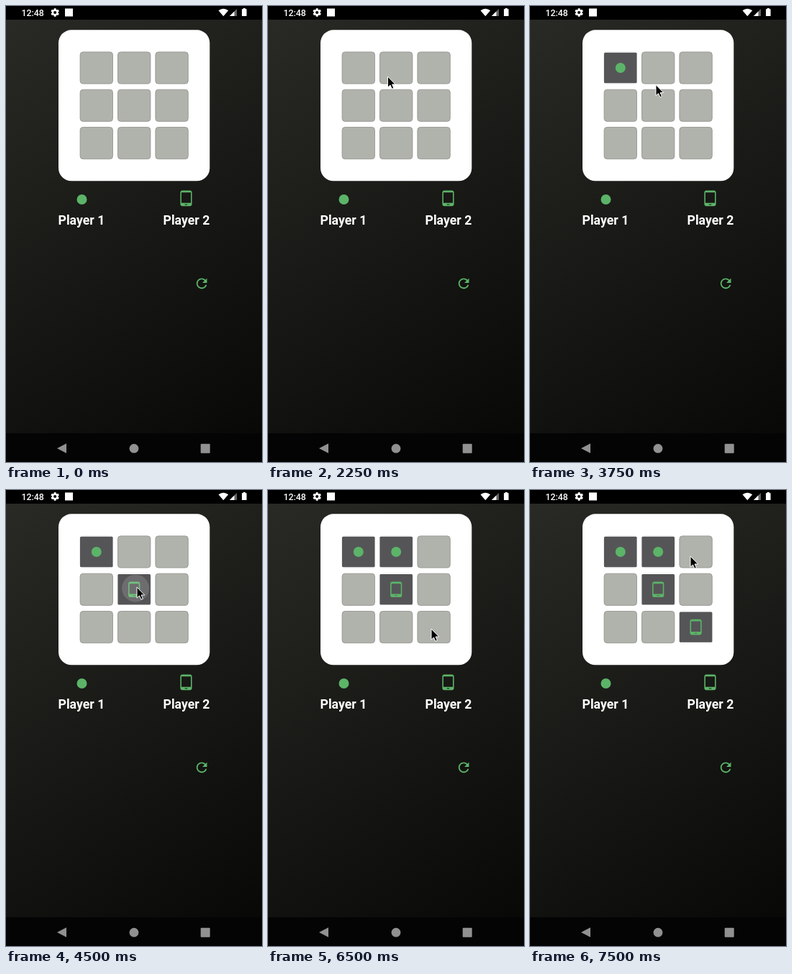
Recreate the animation shown at these times as an HTML page. Size 356x634 px, loop 8000 ms.

```html
<!DOCTYPE html>
<html lang="en">
<head>
<meta charset="utf-8">
<title>Tic-tac-toe</title>
<style>
html, body { margin: 0; width: 100%; height: 100%; overflow: hidden; background: #000; }
svg { display: block; }
text { font-family: Roboto, sans-serif; fill: #fff; }
.name { font-size: 17.7px; font-weight: 700; }
.mark { fill: #5cb468; }
.nav { fill: #919191; }
</style>
</head>
<body>
<svg id="stage" width="356" height="634" viewBox="0 0 356 634">
  <defs>
    <linearGradient id="bg" gradientUnits="userSpaceOnUse" x1="0" y1="19" x2="356" y2="594">
      <stop stop-color="#292925"/><stop offset="1" stop-color="#080807"/>
    </linearGradient>
    <circle id="disc" r="7"/>
    <path id="tablet" transform="scale(.9) translate(-12 -12)" d="M18 0H6C4.34 0 3 1.34 3 3v18c0 1.66 1.34 3 3 3h12c1.66 0 3-1.34 3-3V3c0-1.66-1.34-3-3-3zm-4 22h-4v-1h4v1zm5.25-3H4.75V3h14.5v16z"/>
  </defs>
  <rect y="19" width="356" height="575" fill="url(#bg)"/>
  <rect y="594" width="356" height="40" fill="#040404"/>

  <!-- status bar -->
  <text x="21.4" y="13.5" font-size="12.4" font-weight="500">12:48</text>
  <g fill="#fff">
    <path transform="translate(61.2 2) scale(.58)" d="M19.43 12.98c.04-.32.07-.64.07-.98s-.03-.66-.07-.98l2.11-1.65c.19-.15.24-.42.12-.64l-2-3.46c-.12-.22-.39-.3-.61-.22l-2.49 1c-.52-.4-1.08-.73-1.69-.98l-.38-2.65C14.46 2.18 14.25 2 14 2h-4c-.25 0-.46.18-.49.42l-.38 2.65c-.61.25-1.17.59-1.69.98l-2.49-1c-.23-.09-.49 0-.61.22l-2 3.46c-.13.22-.07.49.12.64l2.11 1.65c-.04.32-.07.65-.07.98s.03.66.07.98l-2.11 1.65c-.19.15-.24.42-.12.64l2 3.46c.12.22.39.3.61.22l2.49-1c.52.4 1.08.73 1.69.98l.38 2.65c.03.24.24.42.49.42h4c.25 0 .46-.18.49-.42l.38-2.65c.61-.25 1.17-.59 1.69-.98l2.49 1c.23.09.49 0 .61-.22l2-3.46c.12-.22.07-.49-.12-.64l-2.11-1.65zM12 15.5c-1.93 0-3.5-1.57-3.5-3.5s1.57-3.5 3.5-3.5 3.5 1.57 3.5 3.5-1.57 3.5-3.5 3.5z"/>
    <rect x="82" y="3.5" width="11" height="11"/>
    <path d="M295.5 6.3Q302.3 1 309.2 6.3L302.3 14.3z"/>
    <path fill="#666" d="M311 14L321 4V14z"/>
    <path d="M311 14L317.5 7.5V14z"/>
    <path d="M328 4.2h1.8V3h3v1.2h1.8V14H328z"/>
  </g>

  <rect x="73" y="33.3" width="210.3" height="210" rx="18" fill="#fff"/>
  <g id="board"></g>

  <g class="mark">
    <use href="#disc" x="105.5" y="269"/>
    <use href="#tablet" x="250.5" y="267.4"/>
    <path transform="translate(261.1 374.8) scale(.92)" d="M17.65 6.35C16.2 4.9 14.21 4 12 4c-4.42 0-7.99 3.58-7.99 8s3.57 8 7.99 8c3.73 0 6.84-2.55 7.73-6h-2.08c-.82 2.33-3.04 4-5.65 4-3.31 0-6-2.69-6-6s2.69-6 6-6c1.66 0 3.14.69 4.22 1.78L13 11h7V4l-2.35 2.35z"/>
  </g>
  <text class="name" x="72.5" y="303.8">Player 1</text>
  <text class="name" x="218.5" y="303.8">Player 2</text>

  <g class="nav">
    <path d="M71 615L84 608.2V621.8z"/>
    <circle cx="178" cy="615.2" r="6.4"/>
    <rect x="270.7" y="608.7" width="13" height="13" rx="1"/>
  </g>

  <path id="cursor" fill="#000" stroke="#fff" stroke-width="1" d="M0 0V15.2L3.5 12 5.9 17.3 8.4 16.2 6.1 11H10.7z"/>
</svg>
<script>
const LOOP = 8000, STEP = 250;

// players alternate: the first plays discs, the second tablets
const moves = [{ cell: 0, at: 2500 }, { cell: 4, at: 4500 }, { cell: 1, at: 5500 }, { cell: 8, at: 6750 }];

// key stops of the pointer tip
const stops = [
  { t: 250, x: 124, y: 81 }, { t: 500, x: 124, y: 87 }, { t: 1250, x: 124, y: 87 },
  { t: 1750, x: 176, y: 96 }, { t: 2750, x: 157, y: 100 }, { t: 3250, x: 170, y: 86 },
  { t: 3500, x: 170, y: 86 }, { t: 4000, x: 180, y: 133 }, { t: 4500, x: 182, y: 135 },
  { t: 5000, x: 212, y: 122 }, { t: 5500, x: 178, y: 99 }, { t: 6500, x: 227, y: 193 },
  { t: 6750, x: 227, y: 193 }, { t: 7500, x: 223, y: 92 }
];

const mix = (a, b, k) => a + (b - a) * k;

function pointer(t) {
  const i = stops.findLastIndex(s => s.t <= t);
  if (i < 0) return null;
  const a = stops[i], b = stops[i + 1] || a;
  const k = a === b ? 0 : (t - a.t) / (b.t - a.t);
  return { x: mix(a.x, b.x, k), y: mix(a.y, b.y, k) };
}

const centre = i => ({ x: 125.8 + i % 3 * 52.4, y: 86 + Math.floor(i / 3) * 52.3 });

function tile(i) {
  const { x, y } = centre(i);
  return `<rect x="${x - 22.7}" y="${y - 22.1}" width="45.4" height="44.2" rx="4"
    fill="#b0b3ac" stroke="#8d908a" stroke-width=".8"/>`;
}

function move({ cell, at }, i) {
  const { x, y } = centre(cell), tap = pointer(at);
  const icon = i % 2 ? 'tablet' : 'disc';
  // the ripple drifts from the tap towards the middle of its tile
  return `<g class="move">
    <rect x="${x - 23.3}" y="${y - 22.7}" width="46.6" height="45.4" fill="#fff"/>
    <rect x="${x - 22.8}" y="${y - 21.2}" width="45.6" height="42.4" rx="1.5" fill="#555557"/>
    <use class="mark" href="#${icon}" x="${x}" y="${y}"/>
    <svg class="ripple" x="${x - 22.8}" y="${y - 21.2}" width="45.6" height="42.4">
      <circle cx="${22.8 + (tap.x - x) / 2}" cy="${21.2 + (tap.y - y) / 2}" r="19" fill="#fff" opacity=".14"/>
    </svg></g>`;
}

const board = document.getElementById('board');
const cursor = document.getElementById('cursor');
board.innerHTML = [...Array(9).keys()].map(tile).join('') + moves.map(move).join('');

const groups = [...board.querySelectorAll('.move')];
const ripples = [...board.querySelectorAll('.ripple')];
const show = (el, on) => { el.style.display = on ? '' : 'none'; };

function draw(time) {
  const t = Math.floor(time % LOOP / STEP) * STEP;
  moves.forEach(({ at }, i) => {
    show(groups[i], t >= at);
    show(ripples[i], t === at);
  });
  const tip = pointer(t);
  show(cursor, tip);
  if (tip) cursor.setAttribute('transform', `translate(${tip.x} ${tip.y})`);
}

const start = performance.now();
function tick() {
  draw(performance.now() - start);
  requestAnimationFrame(tick);
}
tick();
</script>
</body>
</html>
```
